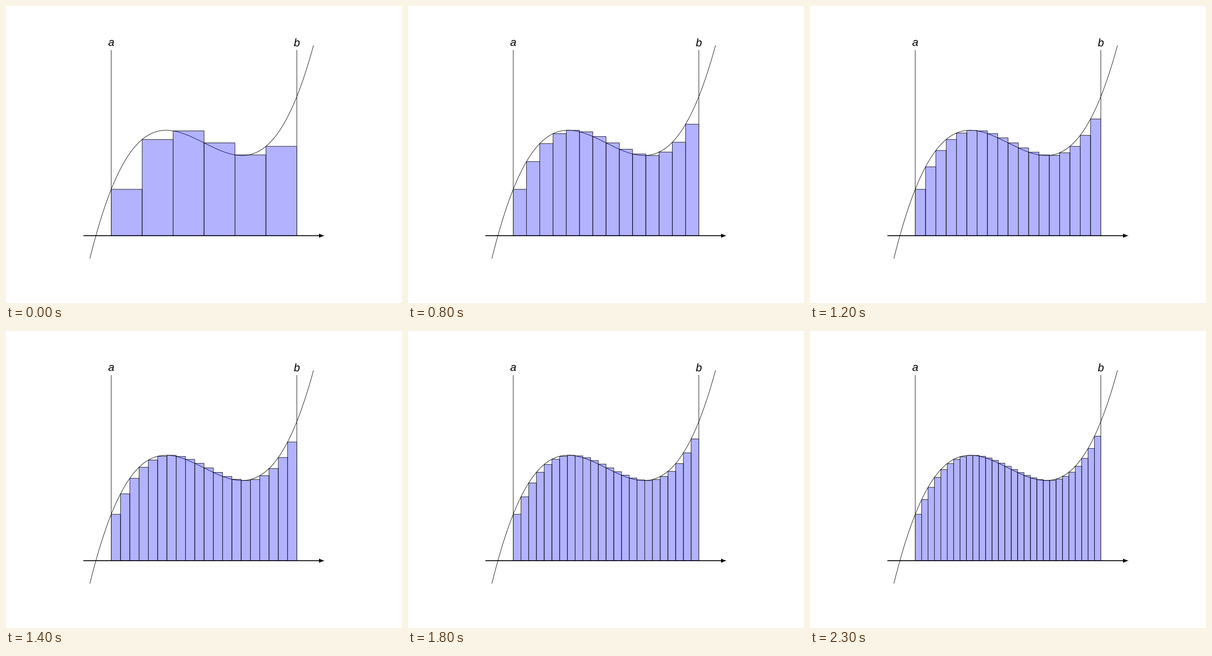
A matplotlib script for the animation above (2.4 s loop, 864 by 648 pixels).

```python
import numpy as np
import matplotlib.pyplot as plt
from matplotlib.animation import FuncAnimation
from matplotlib.collections import PolyCollection
from matplotlib.patches import PathPatch
from matplotlib.path import Path

plt.rcParams["text.hinting"] = "none"

W, H, DPI = 864, 648, 72          # at 72 dpi one point is one pixel
CM = 67.5                         # pixels per drawing unit
A, B = 229.6, 634.6               # interval ends
MID, HALF = (A + B) / 2, (B - A) / 2
BASE = 501.14                     # height of the axis
TOP = BASE - 6 * CM
THIN, THICK = 0.95, 1.9
FIRST, COUNT, STEP = 6, 24, 100   # bars at the start, frames, ms per frame


def f(x):
    u = (x - MID) / HALF
    return BASE - CM * (3 - 1.5 * u + 3 * u**3)


def line(x, y, width=THIN):
    ax.plot(x, y, color="black", lw=width, solid_capstyle="butt",
            snap=False, zorder=1)


def arrow_tip(x, y, s):
    """Curved triangular arrow head ending at (x, y)."""
    pts = np.array([(9, 0), (6.333, 0.5), (2, 2), (-1, 3.75),
                    (-1, -3.75), (2, -2), (6.333, -0.5), (9, 0)])
    codes = [Path.MOVETO] + [Path.CURVE4] * 3 + [Path.LINETO] + [Path.CURVE4] * 3
    path = Path((pts - (9, 0)) * s + (x, y), codes)
    ax.add_patch(PathPatch(path, fc="black", lw=0, snap=False, zorder=1))


def bar_shapes(n):
    edges = np.linspace(A, B, n + 1)
    return [[(l, BASE), (l, f(l)), (r, f(l)), (r, BASE)]
            for l, r in zip(edges[:-1], edges[1:])]


fig = plt.figure(figsize=(W / DPI, H / DPI), dpi=DPI, facecolor="white")
ax = fig.add_axes([0, 0, 1, 1])
ax.set_xlim(0, W)
ax.set_ylim(H, 0)
ax.axis("off")

xs = np.linspace(183.0, 670.9, 300)
line(xs, f(xs))

tip = B + 0.9 * CM
line([A - 0.9 * CM, tip - 11], [BASE, BASE], THICK)
arrow_tip(tip, BASE, 1.234)

for x, name in ((A, "a"), (B, "b")):
    line([x, x], [BASE, TOP])
    ax.text(x, TOP - 8.6, name, family="Liberation Sans", style="italic",
            size=24, ha="center", va="baseline")

# Translucent bars tint the curve and the axis beneath them.
bars = PolyCollection(bar_shapes(FIRST), facecolors=[(0, 0, 1, 0.3)],
                      edgecolors="black", linewidths=THIN,
                      joinstyle="miter", zorder=2)
bars.set_snap(False)
ax.add_collection(bars, autolim=False)


def update(i):
    bars.set_verts(bar_shapes(FIRST + i))
    return (bars,)


anim = FuncAnimation(fig, update, frames=COUNT, interval=STEP,
                     repeat=True, repeat_delay=0, blit=False)
plt.show()
```
